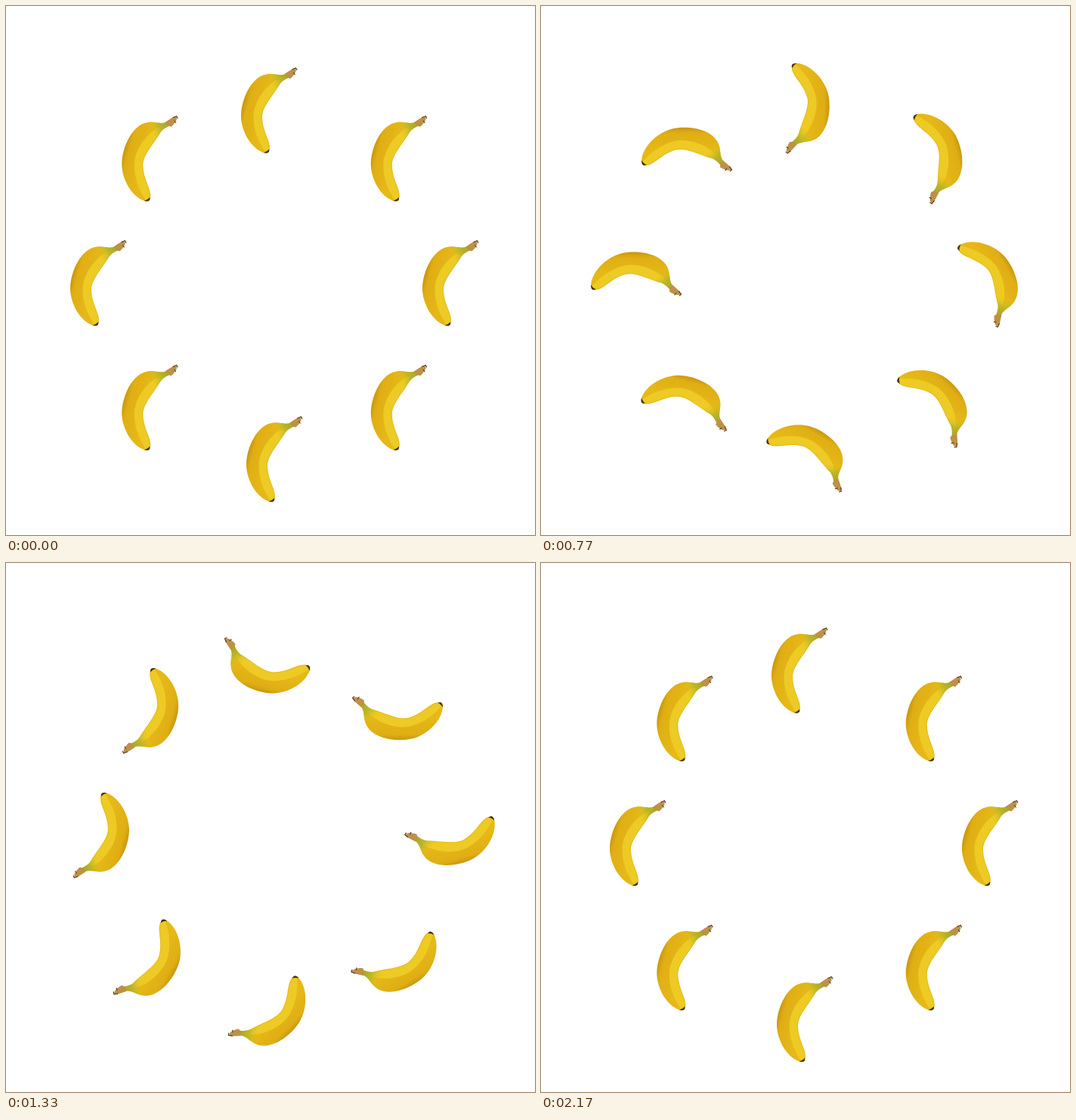
An HTML page that plays this animation: 700 px wide and 700 px high, repeating every 2240 ms.

```html
<!DOCTYPE html>
<html lang="en">
<head>
<meta charset="utf-8">
<title>Banana ring</title>
<style>
  html, body { margin: 0; width: 100%; height: 100%; overflow: hidden; background: #fff; }
  svg { display: block; width: 100vw; height: 100vh; }
</style>
</head>
<body>
<svg id="stage" viewBox="0 0 700 700">
  <defs>
    <linearGradient id="skin" gradientUnits="userSpaceOnUse" x1="-36" y1="0" x2="-6" y2="8">
      <stop offset="0" stop-color="#cc990f"/>
      <stop offset=".2" stop-color="#dfae14"/>
      <stop offset="1" stop-color="#e6b918"/>
    </linearGradient>
    <linearGradient id="green" gradientUnits="userSpaceOnUse" x1="25" y1="-47" x2="3" y2="-38">
      <stop offset="0" stop-color="#a5a530"/>
      <stop offset=".5" stop-color="#b3b428" stop-opacity=".8"/>
      <stop offset="1" stop-color="#d8c020" stop-opacity="0"/>
    </linearGradient>
    <path id="body" d="M22-49C14-46 8-50-1-49C-22-47-36-17-36.5 6C-36.5 28-22 50-7 55L-1 55.500L1.500 49C2 38-8 27-8.500 8C-8.500-6 6-20 15-36C18-40 22-42 26-44Z"/>
    <g id="banana" transform="translate(-1 0)">
      <use href="#body" fill="url(#skin)"/>
      <path fill="#edca24" d="M18-44C1-40-20-15-20 8C-20 29-11 44-5 54L.5 50C1 38-9 27-9.500 8C-9.500-6 5-20 14-36Z"/>
      <use href="#body" fill="url(#green)"/>
      <path fill="#bd9147" d="M21-49L27-53L32-56L36-56L36-52L32-46L29-43L25-44Z"/>
      <path fill="none" stroke="#59391f" stroke-width="1.200" d="M31-55L36-57L37.500-54M33-51L35-48"/>
      <path fill="#40300f" d="M-7 55Q-2 54 1 50L.5 54Q-2 57-7 55Z"/>
    </g>
  </defs>
</svg>
<script>
const STEP_MS = 70, FRAMES = 32, PAUSE = 14, TURN_STEPS = 24;
const COUNT = 8, CENTRE = { x: 355.5, y: 367.5 }, RADIUS = 233;
const TOP_SLIP = { x: -7, y: 4.5 };   // the top banana lies a little off the ring
const { sin, cos, PI } = Math;

const bananas = Array.from({ length: COUNT }, (_, i) => {
  const node = document.createElementNS("http://www.w3.org/2000/svg", "use");
  node.setAttribute("href", "#banana");
  stage.append(node);
  const slip = i ? { x: 0, y: 0 } : TOP_SLIP;
  const angle = i / COUNT * 2 * PI;
  return {
    node, angle,
    x: CENTRE.x + RADIUS * sin(angle) + slip.x,
    y: CENTRE.y - RADIUS * cos(angle) + slip.y,
    delay: Math.min(i, COUNT - 2)     // the last two start together
  };
});

// Each banana makes one full turn and drifts a few pixels on the way
function pose({ node, angle, x, y, delay }, step) {
  const turn = Math.max(0, Math.min(1, (step - delay) / TURN_STEPS));
  const driftX = -2.5 * sin(2 * PI * turn) - 6 * cos(2 * angle) * turn;
  const driftY = 4 * turn - 10 * sin(PI * turn);
  node.setAttribute("transform",
    `translate(${x + driftX} ${y + driftY}) rotate(${turn * 360})`);
}

function draw() {
  const frame = Math.floor(performance.now() / STEP_MS) % FRAMES;
  const step = frame < PAUSE ? frame : frame - 1;
  bananas.forEach(banana => pose(banana, step));
  requestAnimationFrame(draw);
}
draw();
</script>
</body>
</html>
```
